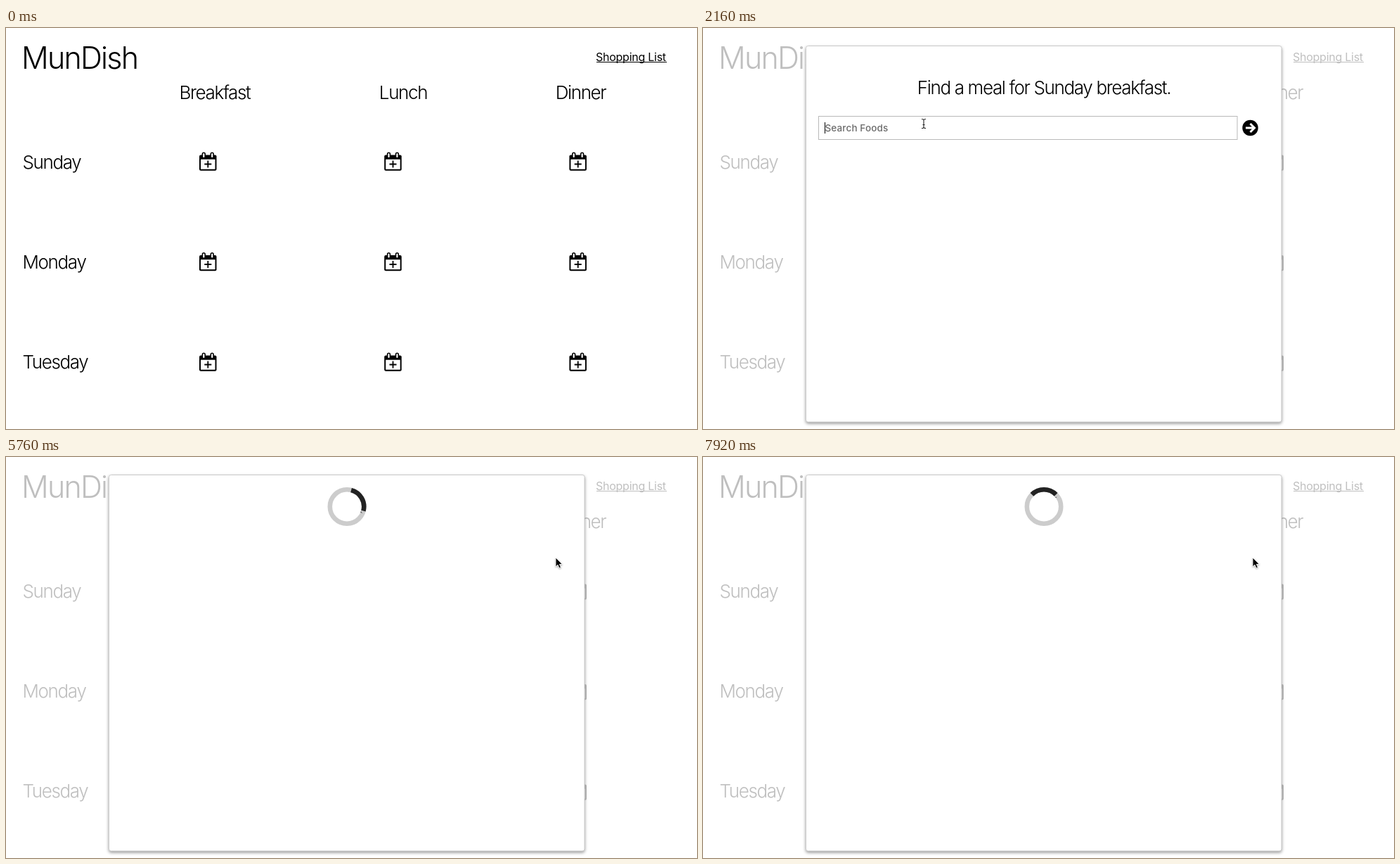
An HTML page that plays this animation: 983 by 570 pixels, repeating every 8 s.

```html
<!DOCTYPE html>
<html lang="en">
<head>
<meta charset="utf-8">
<title>Meal planner</title>
<style>
  html, body { margin: 0; width: 100%; height: 100%; overflow: hidden; background: #fff; }
  svg { display: block; width: 100%; height: 100%; }
  text { font: 350 26px Inter, sans-serif; font-optical-sizing: none; letter-spacing: -.052em; white-space: pre; }
  .title { font-size: 43px; font-weight: 300; letter-spacing: -.042em; }
  .link { font-size: 16px; font-weight: 400; letter-spacing: -.016em; }
  .field { font-size: 13.5px; font-weight: 500; letter-spacing: .01em; }
  .mid { text-anchor: middle; }
  #panel { filter: drop-shadow(0 2px 2px rgba(0, 0, 0, .4)); }
  #arrow { filter: drop-shadow(0 1px 1px rgba(0, 0, 0, .35)); }
</style>
</head>
<body>
<svg viewBox="0 0 983 570">
  <defs>
    <g id="calendar">
      <rect x="-12" y="-9" width="24.5" height="22.3" rx="2"/>
      <rect x="-10" y="-2.8" width="20.5" height="14" fill="#fff"/>
      <g fill="#fff" stroke="#000" stroke-width="1.6">
        <rect x="-7.6" y="-12.2" width="3.8" height="7.6" rx="1.9"/>
        <rect x="4.3" y="-12.2" width="3.8" height="7.6" rx="1.9"/>
      </g>
      <path d="M-4.7 4H5.3M.3-1V9" stroke="#000" stroke-width="1.8"/>
    </g>
  </defs>

  <g id="page">
    <text class="title" x="22" y="58">MunDish</text>
    <text class="link" x="839" y="47">Shopping List</text>
    <path d="M840 48.5H940" stroke="#000"/>
  </g>
  <rect id="ring" x="242" y="160.7" width="90" height="46.6" rx="1.5" fill="none" stroke="#84c3f8" stroke-width="3"/>

  <g id="modal">
    <rect width="983" height="570" fill="#fff" opacity=".75"/>
    <rect id="panel" x="146.5" y="25.5" width="676.5" height="534.5" rx="3" fill="#fff" stroke="#ccc"/>
    <g id="search">
      <text class="mid" x="485" y="94">Find a meal for Sunday breakfast.</text>
      <rect x="164.5" y="125.5" width="595.5" height="33" fill="#fff" stroke="#b9b9b9"/>
      <text id="entry" class="field" x="173.5" y="147"></text>
      <path id="caret" d="M.5 134V150" stroke="#000"/>
      <circle cx="778.5" cy="142" r="11.2"/>
      <path d="M772 142H784M778.5 136L784.5 142L778.5 148" fill="none" stroke="#fff" stroke-width="3"/>
    </g>
    <g id="spinner" fill="none" stroke-width="6.6">
      <circle cx="485" cy="70.5" r="24.2" stroke="#ccc"/>
      <circle id="arc" cx="485" cy="70.5" r="24.2" stroke="#222" pathLength="4" stroke-dasharray="1 4"/>
    </g>
  </g>

  <g id="cursor">
    <path id="arrow" d="M0 0V13L3 10.3L5 15L7.4 14L5.4 9.5H9.5Z" stroke="#fff" stroke-width=".9"/>
    <path id="hand" d="M-1.6 1Q-.2-1.3 1.2 1L2.2 5Q3.4 3.8 4.6 5.2Q6 4.4 6.8 6Q8.6 5.4 8.8 7.4Q8.9 10 7.4 12V14.4H.8V13L-3.4 8Q-3.8 6.2-2 6.6L0 8.2Z" fill="#fff" stroke="#000" stroke-width="1.1" stroke-linejoin="round"/>
    <path id="beam" d="M-3-6.5Q0-6.5 0-5Q0-6.5 3-6.5M0-5V5M-3 6.5Q0 6.5 0 5Q0 6.5 3 6.5M-1.5 1.5H1.5" fill="none" stroke="#222" stroke-width="1.1"/>
  </g>
</svg>
<script>
const LOOP = 8000, STEP = 80, SPIN = 762;
const MODAL_AT = 1520, SUBMIT_AT = 5440, SPINNER_AT = 5760;
const KEY_TIMES = [2960, 3200, 3360, 3520, 3680];
const CARET_OFF = [[1840, 2160], [2560, 2960], [4160, 4560], [4960, 5360]];
const CURSOR_PATH = [
  [0, 400, 4], [640, 285, 191], [720, 286, 194], [1760, 286, 194],
  [2160, 314, 136], [4480, 314, 136], [5040, 788, 142], [5200, 782, 143]
];
const $ = id => document.getElementById(id);
const show = (id, on) => $(id).setAttribute("display", on ? "inline" : "none");
const within = (t, from, to) => t >= from && t < to;

function addLabel(text, x, y, className = "") {
  $("page").insertAdjacentHTML("beforeend", `<text class="${className}" x="${x}" y="${y}">${text}</text>`);
}
[["Breakfast", 297], ["Lunch", 565], ["Dinner", 817.5]].forEach(([meal, x]) => addLabel(meal, x, 100.5, "mid"));
["Sunday", "Monday", "Tuesday"].forEach((day, row) => {
  addLabel(day, 23.5, 199.5 + 142 * row);
  for (let col = 0; col < 3; col++)
    $("page").insertAdjacentHTML("beforeend",
      `<use href="#calendar" x="${287 + 263.2 * col}" y="${189.5 + 142.5 * row}"/>`);
});

function cursorAt(t) {
  const next = CURSOR_PATH.findIndex(p => p[0] > t);
  if (next < 0) return CURSOR_PATH.at(-1).slice(1);
  const [t0, x0, y0] = CURSOR_PATH[next - 1], [t1, x1, y1] = CURSOR_PATH[next];
  const u = (t - t0) / (t1 - t0), ease = u * u * (3 - 2 * u);
  return [x0 + (x1 - x0) * ease, y0 + (y1 - y0) * ease];
}

function cursorShape(t, x, y) {
  if (t < MODAL_AT) return within(x, 241, 333) && within(y, 160, 208) ? "hand" : "arrow";
  if (t >= SUBMIT_AT || !within(y, 125, 159)) return "arrow";
  return x < 760 ? "beam" : "hand";
}

function draw(t) {
  show("ring", within(t, 1360, MODAL_AT));
  show("modal", t >= MODAL_AT);
  show("search", t < SUBMIT_AT);
  show("spinner", t >= SPINNER_AT);

  const typed = "pizza".slice(0, KEY_TIMES.filter(k => t >= k).length);
  const entry = $("entry");
  entry.textContent = typed || "Search Foods";
  entry.setAttribute("fill", typed ? "#000" : "#6b6b6b");
  if (t >= MODAL_AT) {
    const caretX = typed ? 173.5 + entry.getComputedTextLength() : 173;
    $("caret").setAttribute("transform", `translate(${Math.round(caretX)})`);
  }
  show("caret", !CARET_OFF.some(([from, to]) => within(t, from, to)));

  const angle = (t - 7920) / SPIN * 360 - 135;
  $("arc").setAttribute("transform", `rotate(${angle} 485 70.5)`);

  const [x, y] = cursorAt(t), shape = cursorShape(t, x, y);
  show("cursor", t >= STEP);
  $("cursor").setAttribute("transform", `translate(${x} ${y})`);
  for (const id of ["arrow", "hand", "beam"]) show(id, id === shape);
}

const start = performance.now();
function tick() {
  const t = (performance.now() - start) % LOOP;
  draw(Math.floor(t / STEP) * STEP);
  requestAnimationFrame(tick);
}
tick();
</script>
</body>
</html>
```
